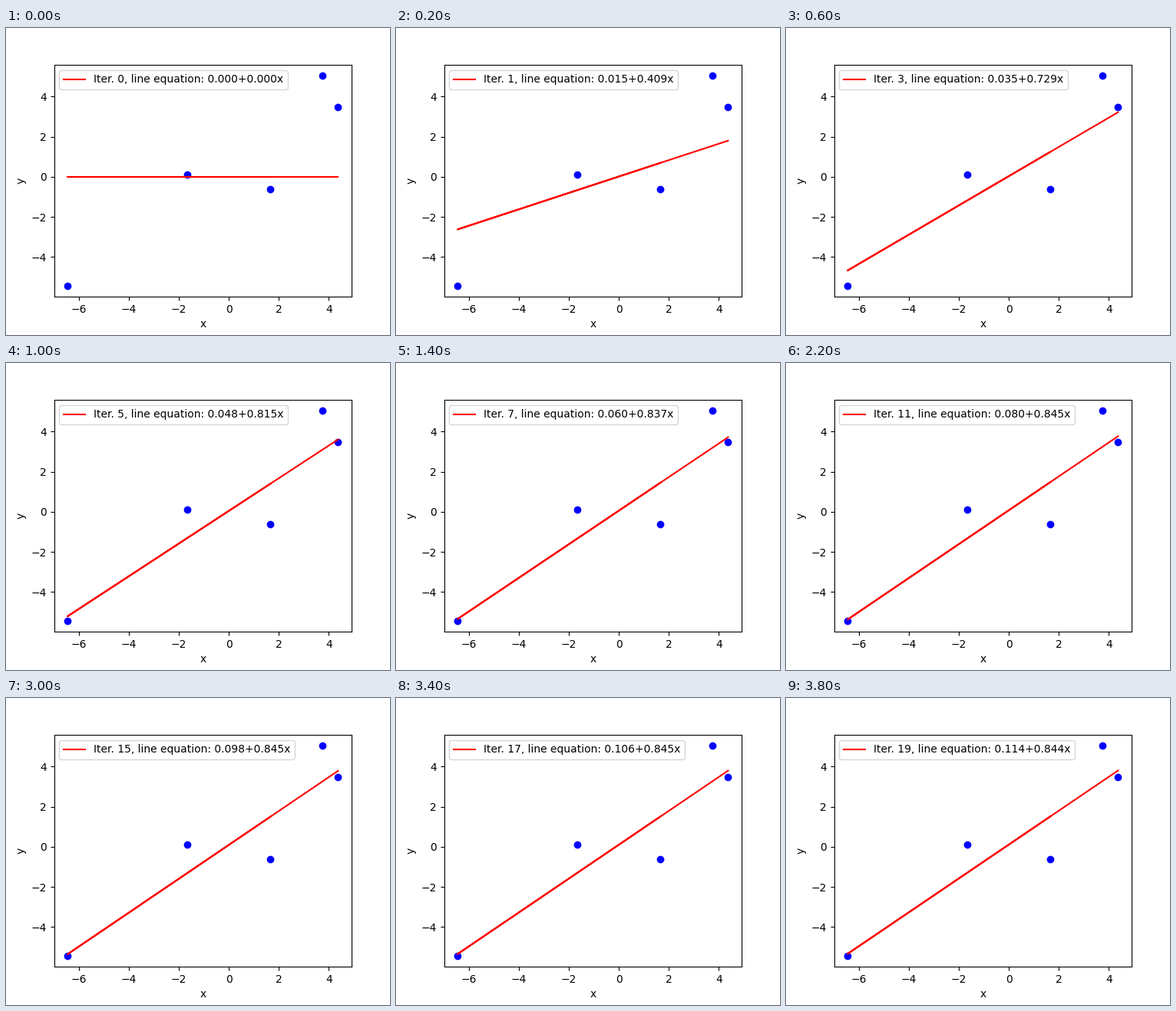
Animation, 500 px wide and 400 px high, one loop 4 s. Source, as a matplotlib script:

```python
import matplotlib.pyplot as plt
import numpy as np
from matplotlib.animation import FuncAnimation

STEPS = 20
RATE = 0.03

x = np.array([1.66, -1.68, -6.46, 3.75, 4.37])
y = np.array([-0.6225, 0.1125, -5.452, 5.06, 3.467])


def descend(steps):
    """Intercept and slope after each gradient descent step."""
    a = b = 0.0
    path = [(a, b)]
    for _ in range(steps - 1):
        error = y - (a + b * x)
        a, b = a + RATE * error.mean(), b + RATE * (error * x).mean()
        path.append((a, b))
    return path


path = descend(STEPS)

fig, ax = plt.subplots(figsize=(5, 4), dpi=100)
fig.subplots_adjust(left=0.125, right=0.9, bottom=0.125, top=0.88)
ax.plot(x, y, "bo")
line, = ax.plot(x, np.zeros_like(x), "r-")
ax.set_xlabel("x")
ax.set_ylabel("y")


def update(i):
    a, b = path[i]
    line.set_ydata(a + b * x)
    line.set_label(f"Iter. {i}, line equation: {a:.3f}+{b:.3f}x")
    legend = ax.legend(loc="upper left")
    return line, legend


anim = FuncAnimation(fig, update, frames=STEPS, interval=200,
                     init_func=lambda: update(0), repeat=True, repeat_delay=0)
plt.show()
```
